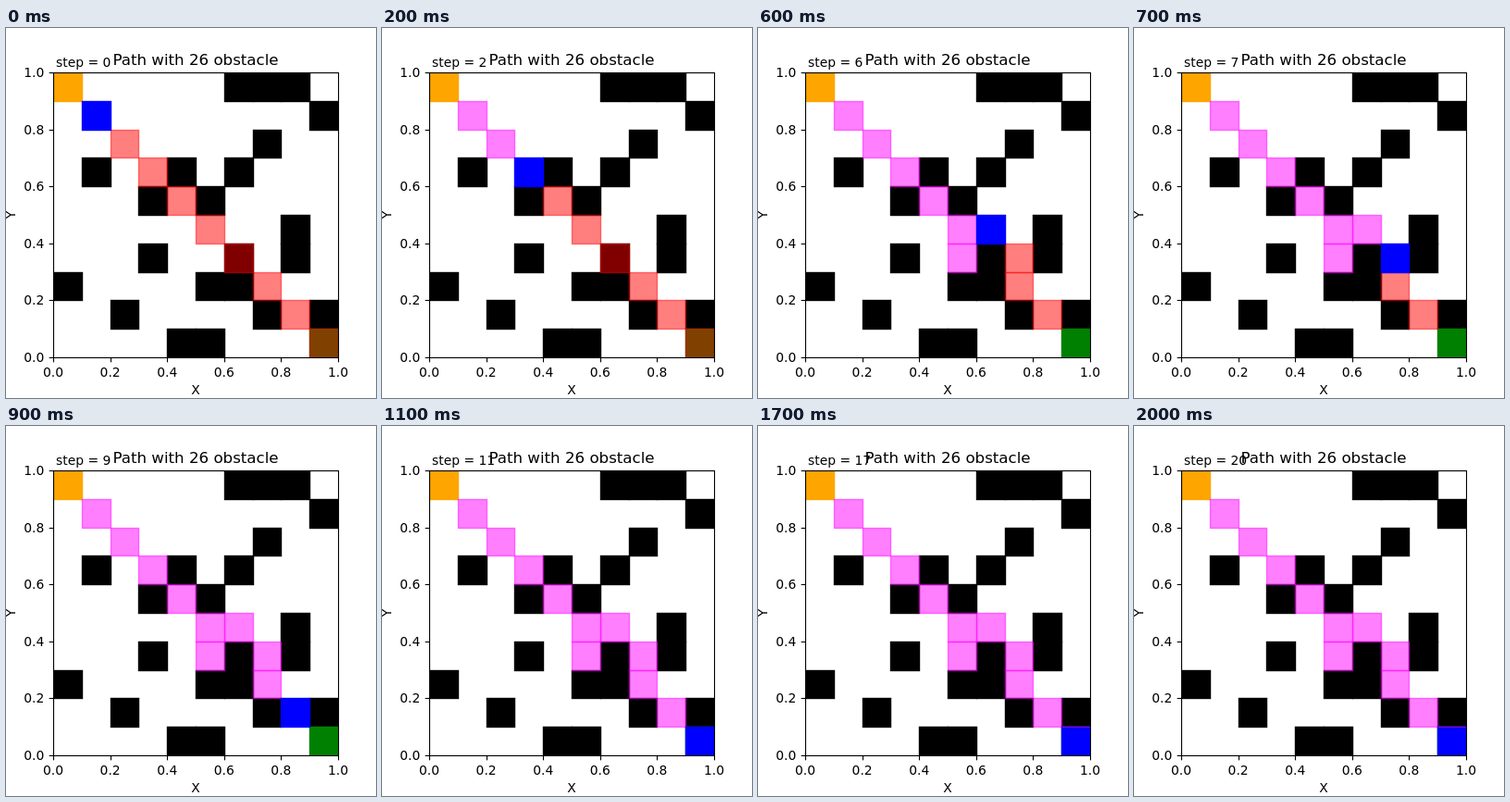
Write an HTML page with a canvas that moves like this. It is 400 by 400 pixels and loops after 2.1 s.

```html
<!DOCTYPE html>
<html lang="en">
<head>
<meta charset="utf-8">
<title>Grid path</title>
<style>
  html, body { margin: 0; width: 100%; height: 100%; overflow: hidden; background: #fff; }
  canvas { display: block; }
</style>
</head>
<body>
<canvas id="stage" width="400" height="400"></canvas>
<script>
const ctx = document.getElementById('stage').getContext('2d');

const STEP_MS = 100, STEPS = 21, REPLAN = 4, LAST = 10;
const LEFT = 51, TOP = 48, SIZE = 308, N = 10;

// Occupied columns, one string per row from the top
const obstacles = ['678', '9', '7', '146', '35', '8', '368', '056', '279', '45'];

const diagonal = Array.from({ length: N - 1 }, (_, i) => [i + 1, i + 1]);
const walk = [
  ...diagonal.slice(0, 5),
  [5, 6], [6, 5], [7, 6], [7, 7], [8, 8], [9, 9]
];

// Grid lines sit on pixel centres
const gx = c => Math.round(LEFT + c * SIZE / N) + 0.5;
const gy = r => Math.round(TOP + r * SIZE / N) + 0.5;

function cell([c, r], color, alpha = 1) {
  const x = gx(c), y = gy(r), w = gx(c + 1) - x, h = gy(r + 1) - y;
  ctx.globalAlpha = alpha;
  ctx.fillStyle = ctx.strokeStyle = color;
  ctx.lineWidth = 1.39;
  ctx.fillRect(x, y, w, h);
  ctx.strokeRect(x, y, w, h);
  ctx.globalAlpha = 1;
}

function line(x1, y1, x2, y2) {
  ctx.beginPath();
  ctx.moveTo(x1, y1);
  ctx.lineTo(x2, y2);
  ctx.stroke();
}

function text(str, x, y, align = 'center', size = 13.89) {
  ctx.font = size + 'px "DejaVu Sans", sans-serif';
  ctx.textAlign = align;
  ctx.fillStyle = '#000';
  ctx.fillText(str, x, y);
}

function drawCells(step) {
  const pos = Math.min(step, LAST);
  ctx.save();
  ctx.beginPath();
  ctx.rect(LEFT, TOP, SIZE, SIZE);
  ctx.clip();

  obstacles.forEach((cols, r) => {
    for (const c of cols) cell([+c, r], '#000');
  });
  cell([0, 0], 'orange');
  cell([9, 9], 'green');

  const plan = step < REPLAN ? diagonal : walk.slice(0, LAST);
  plan.slice(pos + 1).forEach(p => cell(p, '#f00', 0.5));
  walk.slice(0, pos).forEach(p => cell(p, '#f0f', 0.5));
  cell(walk[pos], '#00f');

  // Trail edge that shows along the goal after waiting there
  if (step > 14) {
    ctx.strokeStyle = 'rgba(255, 0, 255, 0.5)';
    ctx.lineWidth = 1.39;
    line(gx(9), gy(9), gx(10), gy(9));
  }
  ctx.restore();
}

function drawAxes() {
  ctx.strokeStyle = '#000';
  ctx.lineWidth = 1.11;
  ctx.strokeRect(gx(0), gy(0), SIZE, SIZE);
  for (let i = 0; i <= N; i += 2) {
    const label = (i / N).toFixed(1);
    const x = gx(i), y = gy(N - i);
    line(x, gy(N), x, gy(N) + 4.86);
    line(gx(0), y, gx(0) - 4.86, y);
    text(label, LEFT + i * SIZE / N, 377);
    text(label, 41.3, Math.round(y - 0.5) + 5, 'right');
  }
  text('X', 205, 396);
  ctx.save();
  ctx.translate(10, 202);
  ctx.rotate(-Math.PI / 2);
  text('Y', 0, 0);
  ctx.restore();
}

function draw(step) {
  ctx.fillStyle = '#fff';
  ctx.fillRect(0, 0, 400, 400);
  drawCells(step);
  drawAxes();
  text('Path with 26 obstacle', 205, 40, 'center', 16.67);
  text('step = ' + step, 54, 42, 'left');
}

const start = performance.now();
function tick() {
  draw(Math.floor((performance.now() - start) / STEP_MS) % STEPS);
  requestAnimationFrame(tick);
}
tick();
</script>
</body>
</html>
```
